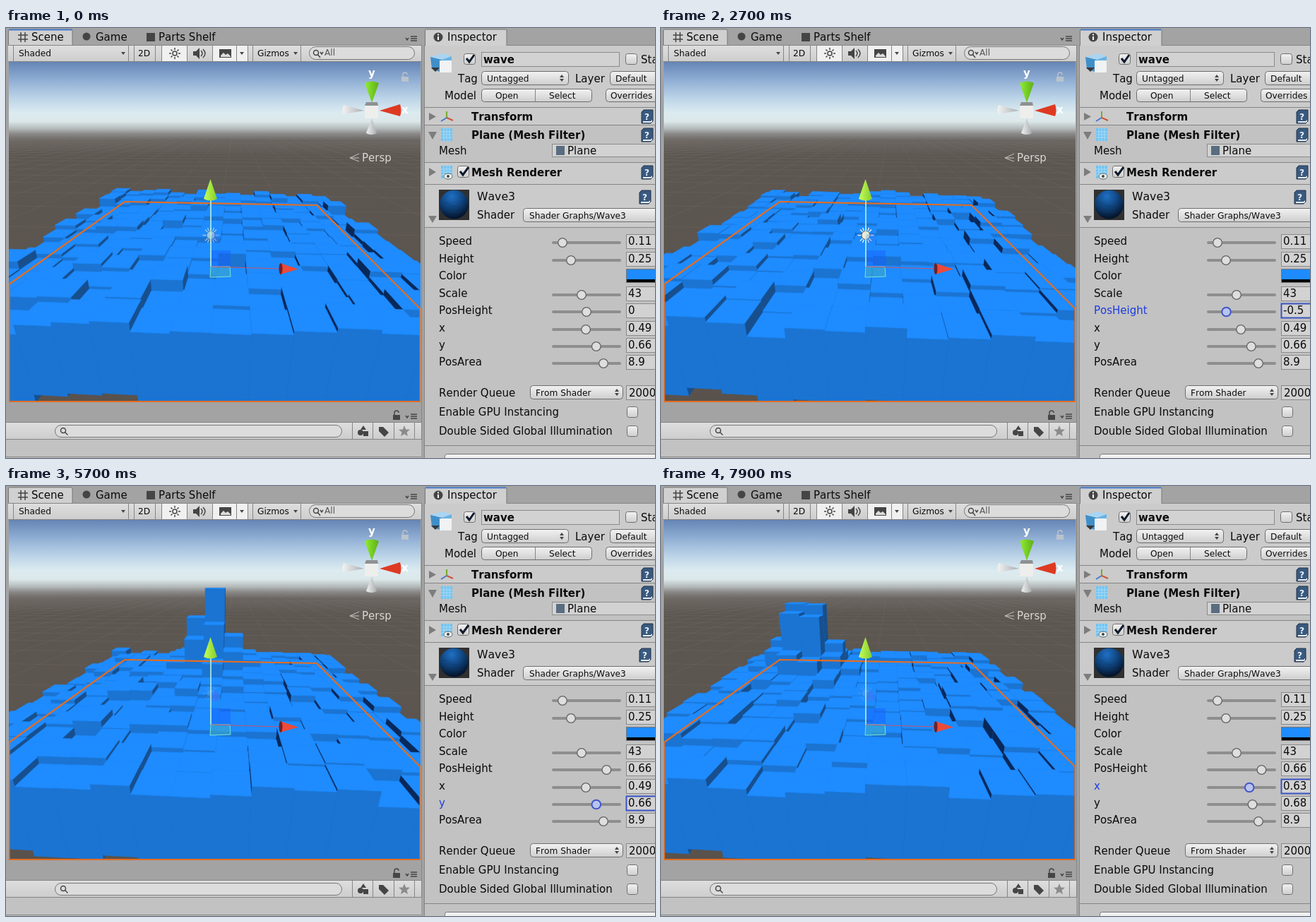
Write an HTML page with a canvas that moves like this. It is 919x609 px and loops after 8 s.

```html
<!DOCTYPE html>
<html lang="en">
<head>
<meta charset="utf-8">
<title>Wave shader inspector</title>
<style>
html, body { margin: 0; width: 100%; height: 100%; overflow: hidden; background: #a3a3a3; }
#stage { position: relative; width: 919px; height: 609px; overflow: hidden; }
#stage > * { position: absolute; left: 0; top: 0; }
text { font: 15px "DejaVu Sans", Verdana, sans-serif; font-kerning: none; fill: #0b0b0b; white-space: pre; }
.s { font-size: 12.2px; }
.b { font-weight: bold; }
.panel { fill: #c2c2c2; }
.head { fill: #cbcbcb; }
.btn { fill: url(#btn); stroke: #6e6e6e; }
.field { fill: #d2d2d2; stroke: #8a8a8a; }
.rule { stroke: #858585; fill: none; }
.ink { fill: #454545; }
.line { fill: none; stroke: #454545; stroke-width: 1.5; }
.track { fill: #8e8e8e; }
.knob { fill: #dedede; stroke: #626262; stroke-width: 1.3; }
.on text.label { fill: #1d3ee0; }
.on .knob { fill: #b9c3ee; stroke: #4058c8; stroke-width: 2; }
.on .field { stroke: #3a54c4; stroke-width: 2; }
</style>
</head>
<body>
<div id="stage">
<canvas id="scene" width="919" height="609"></canvas>
<svg id="ui" width="919" height="609" viewBox="0 0 919 609">
  <defs>
    <linearGradient id="btn" x2="0" y2="1"><stop stop-color="#f2f2f2"/><stop offset="1" stop-color="#cecece"/></linearGradient>
    <linearGradient id="bar" x2="0" y2="1"><stop stop-color="#dedede"/><stop offset="1" stop-color="#cdcdcd"/></linearGradient>
    <linearGradient id="green"><stop stop-color="#8fee32"/><stop offset="1" stop-color="#5fae18"/></linearGradient>
    <linearGradient id="lime"><stop stop-color="#c4ff5a"/><stop offset="1" stop-color="#86cc2c"/></linearGradient>
    <linearGradient id="grey"><stop stop-color="#f2f2f2"/><stop offset="1" stop-color="#a9adb0"/></linearGradient>
    <radialGradient id="ball" cx=".42" cy=".22" r=".75"><stop stop-color="#2070c4"/><stop offset=".45" stop-color="#114a88"/><stop offset="1" stop-color="#05152c"/></radialGradient>
    <g id="help"><path d="M-8 -6l3 -3H8V7l-3 3H-8z" fill="#39597f" stroke="#22344c"/><path d="M-6 7h11l2 -2v3l-2 1H-6z" fill="#e8eef6"/><text class="b s" x="-4" y="5" style="fill:#e8f0fa">?</text></g>
    <path id="down" d="M-3 -2h6l-3 4z" class="ink"/>
    <path id="updown" d="M-3 -1l3 -4 3 4zM-3 1l3 4 3 -4z" class="ink"/>
    <g id="lock"><rect x="-5" y="-1" width="10" height="7" fill="currentColor"/><path d="M-3 -1v-3a3 3 0 0 1 6 0" fill="none" stroke="currentColor" stroke-width="1.5"/></g>
    <path id="menu" class="line" d="M-2 -4h9M-2 -1h9M-2 2h9M-9 -2l2 3 2 -3"/>
  </defs>

  <!-- selection outline and move handles -->
  <path d="M4.500 363L168 246 440 251 587 398M4.500 363V529H586.500V398" fill="none" stroke="#e46d22" stroke-width="2.200"/>
  <g id="sun">
    <path d="M290 282v23M278.500 293.500h23M282 285.500l16 16M298 285.500l-16 16M285.500 283l9 21M294.500 283l-9 21" stroke="#e8ecec" stroke-width="1.5"/>
    <circle cx="290" cy="293.500" r="6" fill="#f1edd5" stroke="#47576b"/>
  </g>
  <circle id="orb" cx="296" cy="298" r="7" fill="#3978f5" opacity=".75"/>
  <rect x="291" y="315" width="27" height="23" fill="#165eff" opacity=".45"/>
  <path d="M290 338h27l1 14-29 1z" fill="#39a8cf" fill-opacity=".65" stroke="#79e4d0"/>
  <path d="M290 338V242" stroke="#b9f3dc" stroke-width="1.6"/>
  <path d="M290 338L388 341" stroke="#c2556d" stroke-width="1.2"/>
  <path d="M289.500 214L299 242Q290 247 280 242z" fill="url(#lime)"/>
  <path d="M388 333L414 341.500 388 349z" fill="#ed4a39"/><ellipse cx="389" cy="341" rx="2.500" ry="8" fill="#6e2029"/>

  <!-- orientation gizmo -->
  <path d="M478 109q-3 7 0 13L507 117z" fill="url(#grey)"/>
  <path d="M508 78q10 -5 20 0L518 106z" fill="url(#green)"/>
  <path d="M558 108q3 9 0 17L529 117z" fill="#de3a22"/>
  <path d="M510 149q8 4 15 0L518 128z" fill="url(#grey)"/>
  <path d="M508 110h19v18h-19z" fill="#eeeeec"/><path d="M508 110l2 -5h16l1 5z" fill="#8e9193"/>
  <text class="b" x="513" y="69" style="fill:#fff">y</text><text class="b" x="560" y="121" style="fill:#fff">x</text>
  <use href="#lock" x="565" y="70" color="#b9c3cc"/>
  <path d="M500 178L487 184 500 189M487 184h13" fill="none" stroke="#c9c6c3"/>
  <text x="504" y="189" style="fill:#dad7d4">Persp</text>

  <!-- scene tabs and toolbar -->
  <path d="M0 0H592V25H0zM0 25H4V530H0zM587 25h6V609h-6zM0 530H592v30H0z" fill="#a3a3a3"/>
  <path class="rule" d="M588.500 24V583M592.500 24V609"/>
  <path d="M3.500 25V4q0 -2 2 -2H92q2 0 2 2V25" fill="#d0d0d0" stroke="#777"/>
  <path id="sceneFocus" d="M4 2.500H94" stroke="#4a7fd4" stroke-width="2"/>
  <path class="line" d="M21 6v14M27 6v14M17 10h14M17 16h14"/>
  <text x="36" y="18">Scene</text>
  <circle class="ink" cx="114" cy="12" r="5.500"/><text x="127" y="18">Game</text>
  <rect class="ink" x="199" y="7" width="12" height="12"/><text x="216" y="18">Parts Shelf</text>
  <use href="#menu" x="575" y="16"/>
  <path d="M3 25H588V48H3z" fill="url(#bar)"/>
  <path d="M221 25h35v22h-35zM293 25h49v22h-49z" fill="#f0f0f0"/>
  <path class="rule" d="M3 24.500H588M3 47.500H588M10.500 25v22M173.500 25v22M181.500 25v22M211.500 25v22M220.500 25v22M256.500 25v22M292.500 25v22M326.500 25v22M342.500 25v22M349.500 25v22M417.500 25v22"/>
  <text class="s" x="18" y="40">Shaded</text><use href="#down" x="166" y="36"/>
  <text class="s" x="187" y="40">2D</text>
  <circle cx="239" cy="36" r="3" class="line"/><path class="line" d="M239 28v3M239 41v3M231 36h3M244 36h3M233.500 30.500l2 2M242.500 39.500l2 2M244.500 30.500l-2 2M235.500 39.500l-2 2"/>
  <path class="ink" d="M265 33h4l5 -5v16l-5 -5h-4z"/><path class="line" d="M276 32q4 4 0 8M279 30q6 6 0 12"/>
  <rect class="ink" x="302" y="30" width="17" height="12"/><path d="M304 39l4 -4 3 3 3 -2 4 4v1h-14z" fill="#ddd"/>
  <use href="#down" x="334" y="36"/>
  <text class="s" x="356" y="40">Gizmos</text><use href="#down" x="410" y="36"/>
  <rect x="429.500" y="26.500" width="149" height="18" rx="9" fill="#dcdcdc" stroke="#777"/>
  <circle cx="439" cy="35" r="3.500" class="line"/><path class="line" d="M441 37l4 5M445 34l2 3 2 -3"/>
  <text class="s" x="451" y="39" style="fill:#555">All</text>

  <!-- lower panel -->
  <use href="#lock" x="553" y="549" color="#454545"/><use href="#menu" x="575" y="551"/>
  <path d="M0 559H588V582H0z" fill="url(#bar)"/><path class="panel" d="M0 582H588V609H0z"/>
  <path class="rule" d="M0 558.500H588M0 582.500H588M0 607.500H588M490.500 559v23M519.500 559v23M549.500 559v23M578.500 559v23"/>
  <rect x="69.500" y="562.500" width="406" height="17" rx="8.500" fill="#dcdcdc" stroke="#777"/>
  <circle cx="81" cy="570" r="3.500" class="line"/><path class="line" d="M83.500 572.500l4 4"/>
  <circle class="ink" cx="502" cy="573" r="4"/><path class="ink" d="M502 569l4 -6 4 6zM506 571h7v7h-7z"/>
  <path class="ink" d="M528 565h6l8 8-6 6-8 -8z"/>
  <path d="M564 563l2.200 5.500 5.800 .300-4.500 3.700 1.500 5.500-5 -3-5 3 1.500 -5.500-4.500 -3.700 5.800 -.300z" fill="#8b8b8b"/>

  <!-- inspector -->
  <path d="M593 0H919V25H593z" fill="#a3a3a3"/><path class="panel" d="M593 25H919V609H593z"/>
  <path class="head" d="M593 25H919V112H593zM593 113H919V137H593zM593 191H919V221H593zM593 222H919V282H593z"/>
  <path d="M593.500 25V4q0 -2 2 -2H707q2 0 2 2V25" fill="#d0d0d0" stroke="#777"/>
  <path id="panelFocus" d="M594 2.500H708" stroke="#4a7fd4" stroke-width="2"/>
  <circle class="ink" cx="612" cy="13" r="6.500"/><path d="M612 12v5M612 8.500v2" stroke="#fff" stroke-width="2"/>
  <text x="625" y="18">Inspector</text>
  <path class="rule" d="M709 24.500H919M593 112.500H919M593 137.500H919M593 190.500H919M593 221.500H919M593 282.500H919M593 591.500H919"/>
  <path d="M601 41l17 -5 13 4-14 5z" fill="#a9d4f2"/><path d="M601 41l16 4v18l-14 -5z" fill="#3f8fc9"/><path d="M617 45l14 -5v17l-14 6z" fill="#69b4e4"/>
  <path d="M614 46h17v17h-17z" fill="#f0f2f3"/><path d="M602 56h12l-6 6z" fill="#383838"/>
  <g class="btn"><rect x="648.500" y="36.500" width="16" height="15" rx="3"/><rect x="877.500" y="36.500" width="16" height="15" rx="3"/><rect x="639.500" y="195.500" width="16" height="16" rx="3"/>
  <rect x="673.500" y="61.500" width="123" height="19" rx="4"/><rect x="855.500" y="61.500" width="75" height="19" rx="4"/>
  <rect x="673.500" y="86.500" width="156" height="18" rx="4"/><rect x="849.500" y="86.500" width="80" height="18" rx="4"/>
  <rect x="732.500" y="255.500" width="200" height="19" rx="4"/><rect x="742.500" y="506.500" width="131" height="19" rx="4"/>
  <rect x="879.500" y="536.500" width="15" height="15" rx="3"/><rect x="879.500" y="563.500" width="15" height="15" rx="3"/></g>
  <path d="M652 43l4 5 7 -10M643 203l4 5 8 -11" fill="none" stroke="#101a2c" stroke-width="3"/>
  <rect class="field" x="673.500" y="34.500" width="195" height="20"/><text class="b" x="676" y="50">wave</text><text x="899" y="50">Static</text>
  <text x="640" y="77">Tag</text><text class="s" x="681" y="76">Untagged</text><use href="#updown" x="787" y="71"/>
  <text x="806" y="77">Layer</text><text class="s" x="863" y="76">Default</text>
  <text x="621" y="101">Model</text><text class="s" x="693" y="100">Open</text><text class="s" x="769" y="100">Select</text><text class="s" x="856" y="100">Overrides</text>
  <path class="rule" d="M749.500 87v17"/>
  <path d="M599 120v11l10 -5.500zM598 147h12l-6 11zM599 198v12l10 -6zM598 266h12l-6 10z" fill="#7d7d7d"/>
  <path d="M624 118v9" stroke="#78aa2e" stroke-width="2"/><path d="M624 127l-8 5" stroke="#427bcd" stroke-width="2"/><path d="M624 127l9 4" stroke="#d45135" stroke-width="2"/>
  <text class="b" x="659" y="131">Transform</text>
  <path d="M616 142h16v18h-16zM616 195h16v18h-16z" fill="#72c3f0"/>
  <path d="M616 147h16M616 151h16M616 155h16M620 142v18M624 142v18M628 142v18M616 200h16M616 204h16M616 208h16M620 195v18M624 195v18M628 195v18" stroke="#a7dcf7"/>
  <ellipse cx="626" cy="210" rx="6" ry="4" fill="#f2f4f5" stroke="#566"/><circle cx="626" cy="210" r="2" class="ink"/>
  <text class="b" x="659" y="157">Plane (Mesh Filter)</text>
  <text x="613" y="179">Mesh</text><rect class="field" x="773.500" y="164.500" width="160" height="18"/><path d="M779 167h12v13h-12z" fill="#596c80"/><text x="795" y="179">Plane</text>
  <text class="b" x="659" y="210">Mesh Renderer</text>
  <use href="#help" x="908" y="125"/><use href="#help" x="908" y="151"/><use href="#help" x="908" y="204"/><use href="#help" x="905" y="239"/>
  <rect x="613" y="229" width="43" height="43" fill="#303030"/><circle cx="634.500" cy="250" r="20.500" fill="url(#ball)"/>
  <path d="M617 246l8 2 5 4 9 1M621 257l10 4 12 -1" fill="none" stroke="#0c3c70" opacity=".6"/>
  <text x="667" y="244" style="font-size:15.700px">Wave3</text><text x="667" y="270">Shader</text><text class="s" x="741" y="270">Shader Graphs/Wave3</text>
  <g id="rows"></g>
  <text x="613" y="356">Color</text><rect x="878.500" y="341.500" width="60" height="19" fill="#1e8bff" stroke="#777"/><path d="M879 356h41v4h-41z" fill="#000"/>
  <text x="613" y="522">Render Queue</text><text class="s" x="750" y="521">From Shader</text><use href="#updown" x="865" y="516"/>
  <rect class="field" x="878.500" y="506.500" width="60" height="20"/><text x="882" y="522">2000</text>
  <text x="613" y="549">Enable GPU Instancing</text><text x="613" y="576">Double Sided Global Illumination</text>
  <rect x="621.500" y="603.500" width="320" height="20" rx="3" fill="#f0f0f0" stroke="#777"/>
</svg>
</div>
<script>
const $ = id => document.getElementById(id);
const ctx = $('scene').getContext('2d');

// Property rows: name, baseline, value, knob position
const rows = {};
[['Speed', 307, .11, 788], ['Height', 332, .25, 800], ['Scale', 381, 43, 815], ['PosHeight', 405, 0, 822],
 ['x', 430, .49, 821], ['y', 454, .66, 835.5], ['PosArea', 478, 8.9, 846]].forEach(([name, y, value, knob]) => {
  const g = document.createElementNS('http://www.w3.org/2000/svg', 'g');
  g.innerHTML = `<text class="label" x="613" y="${y}">${name}</text>
    <rect class="track" x="773" y="${y - 5}" width="98" height="4" rx="2"/>
    <circle class="knob" cx="${knob}" cy="${y - 3}" r="6.300"/>
    <rect class="field" x="878.500" y="${y - 14.5}" width="60" height="20"/>
    <text class="value" x="881" y="${y}">${value}</text>`;
  $('rows').append(g);
  rows[name] = g;
});
function setRow(name, value, knob, focus) {
  const g = rows[name];
  g.querySelector('.knob').setAttribute('cx', knob);
  g.querySelector('.value').textContent = +value.toFixed(2) || 0;
  g.classList.toggle('on', name === focus);
}

// Eased interpolation through [time, value] keys
function track(keys, t) {
  const i = keys.findIndex(k => k[0] > t);
  if (i < 0) return keys[keys.length - 1][1];
  if (!i) return keys[0][1];
  const [t0, a] = keys[i - 1], [t1, b] = keys[i], u = (t - t0) / (t1 - t0);
  return a + (b - a) * u * u * (3 - 2 * u);
}
const heightKeys = [[2000, 0], [2700, -.5], [3000, -.5], [3600, .12], [4200, .58], [4600, .66]];
const xKeys = [[7350, .49], [7900, .63]];
const yKeys = [[5700, .66], [6300, .72], [7000, .55], [7300, .68]];

// Camera
const F = 417, EYE = 3.92, COS = .937, SIN = .3486, YC = .998, YS = .063;
function project(x, h, z) {
  const side = -.1 + YC * x + YS * z, far = 7.66 - YS * x + YC * z, drop = EYE - h;
  const depth = drop * SIN + far * COS;
  return [295 + F * side / depth, 289 + F * (drop * COS - far * SIN) / depth];
}
function face(color, ...pts) {
  ctx.beginPath();
  pts.forEach(p => ctx.lineTo(...project(...p)));
  ctx.closePath();
  ctx.fillStyle = ctx.strokeStyle = color;
  ctx.fill();
  ctx.stroke();
}

const hash = (i, j) => { const v = Math.sin(i * 127.1 + j * 311.7) * 43758.5453; return v - Math.floor(v); };
function noise(x, y) {
  const i = Math.floor(x), j = Math.floor(y), s = u => u * u * (3 - 2 * u), u = s(x - i), v = s(y - j);
  const mix = (a, b, k) => a + (b - a) * k;
  return mix(mix(hash(i, j), hash(i + 1, j), u), mix(hash(i, j + 1), hash(i + 1, j + 1), u), v);
}

function drawBackdrop() {
  const g = ctx.createLinearGradient(0, 48, 0, 530);
  [[48, '#6585b5'], [75, '#92b0d5'], [100, '#bdd5e8'], [120, '#dcebf0'], [132, '#dce8ea'], [142, '#b6bcbd'],
   [150, '#8a8988'], [160, '#67625e'], [180, '#5d5752'], [530, '#59524c']].forEach(([y, c]) => g.addColorStop((y - 48) / 482, c));
  ctx.fillStyle = g;
  ctx.fillRect(4, 48, 583, 482);
  ctx.strokeStyle = 'rgba(150,146,140,.2)';
  ctx.beginPath();
  for (let k = -60; k <= 60; k += 3) {
    ctx.moveTo(...project(k, 0, 3));
    ctx.lineTo(...project(k, 0, 70));
    if (k > 0) { ctx.moveTo(...project(-70, 0, k)); ctx.lineTo(...project(70, 0, k)); }
  }
  ctx.stroke();
}

const N = 15, CELL = .683, LEFT = -5.2, FRONT = -3.65, EYE_X = .58;
function drawBlocks(s, amount, px, py) {
  const cx = -.2 - (px - .49) * 16.2, cz = 3.45 - (py - .66) * 11;
  const lift = amount > 0 ? amount * 4.5 : amount * .3;
  const block = (c, r) => {
    const x0 = LEFT + c * CELL, x1 = x0 + CELL, z0 = FRONT + r * CELL, z1 = z0 + CELL;
    const d2 = (x0 + CELL / 2 - cx) ** 2 + (z0 + CELL / 2 - cz) ** 2;
    const wave = noise(c * 1.63 + s * 1.1, r * 1.27 + s * .6 + 20) - .5;
    const h = .64 + wave * .46 + lift * (.88 * Math.exp(-d2 / .85) + .12 * Math.exp(-d2 / 5));
    const b = h - 1.63;
    if (x0 > EYE_X) face('#09285a', [x0, h, z0], [x0, h, z1], [x0, b, z1], [x0, b, z0]);
    if (x1 < EYE_X) face('#174f8e', [x1, h, z0], [x1, h, z1], [x1, b, z1], [x1, b, z0]);
    face('#1b74d2', [x0, h, z0], [x1, h, z0], [x1, b, z0], [x0, b, z0]);
    face('#1e8bff', [x0, h, z0], [x1, h, z0], [x1, h, z1], [x0, h, z1]);
  };
  const mid = Math.floor((EYE_X - LEFT) / CELL);
  for (let r = N - 1; r >= 0; r--) {
    for (let c = 0; c < mid; c++) block(c, r);
    for (let c = N - 1; c >= mid; c--) block(c, r);
  }
}

function render(t) {
  const amount = track(heightKeys, t), px = track(xKeys, t), py = track(yKeys, t);
  const focus = t < 2000 ? '' : t < 5500 ? 'PosHeight' : t < 7300 ? 'y' : 'x';
  setRow('PosHeight', amount, 822 + amount * 43, focus);
  setRow('x', px, 778.7 + px * 86.5, focus);
  setRow('y', py, 778.7 + py * 86.5, focus);
  $('sceneFocus').style.opacity = focus ? 0 : 1;
  $('panelFocus').style.opacity = focus ? 1 : 0;
  $('sun').style.opacity = amount < -.1 ? 1 : focus ? .12 : t < 700 ? .6 : .2;
  $('orb').style.opacity = amount > 0 ? .75 : .3;

  ctx.save();
  ctx.beginPath();
  ctx.rect(4, 48, 583, 482);
  ctx.clip();
  ctx.lineWidth = .6;
  drawBackdrop();
  drawBlocks(t / 1000, amount, px, py);
  ctx.restore();
}

const start = performance.now();
function tick() {
  const t = (performance.now() - start) % 8000;
  render(Math.floor(t / 100) * 100);
  requestAnimationFrame(tick);
}
tick();
</script>
</body>
</html>
```
